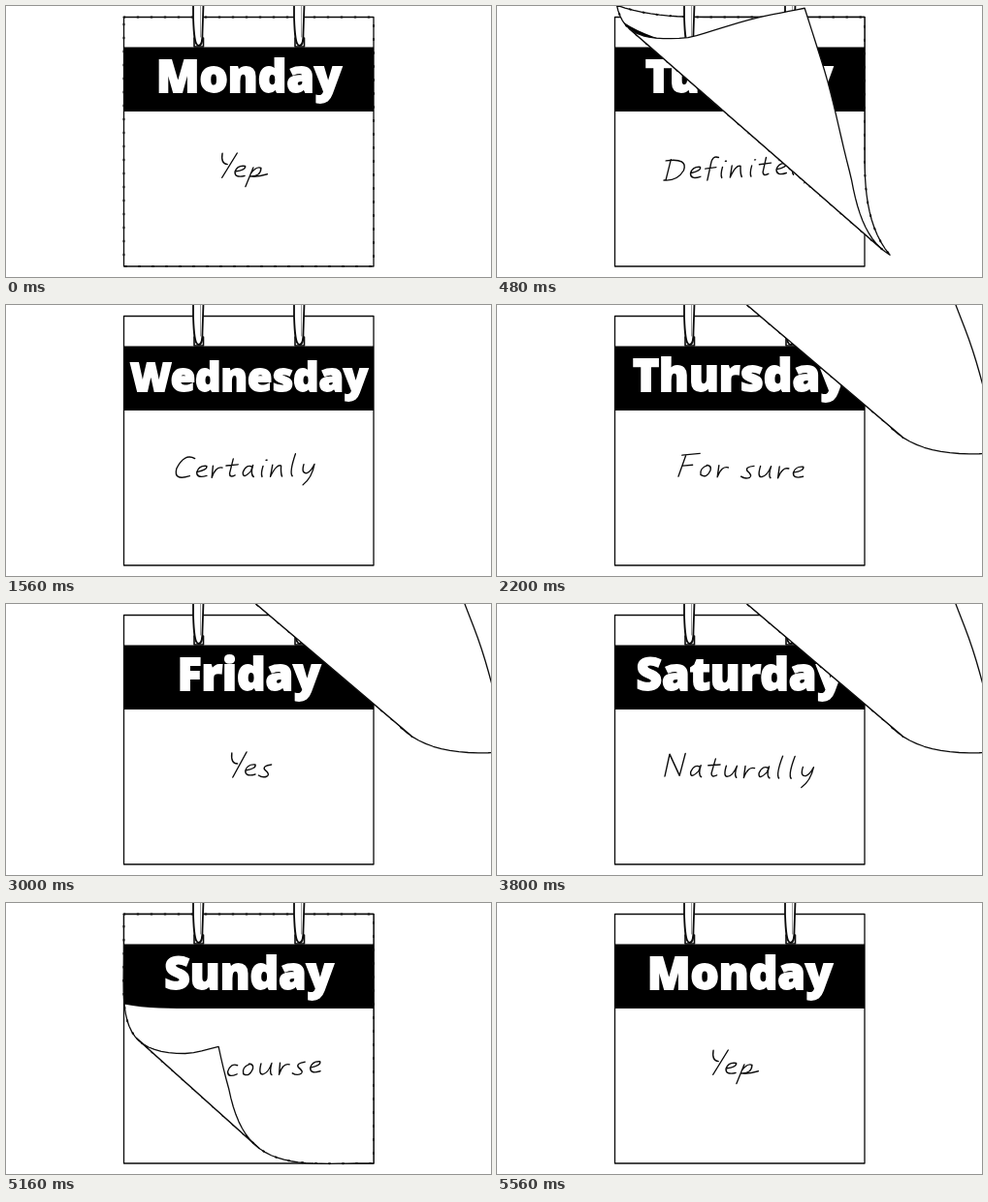
An HTML page with a canvas that plays this animation: 500x280 px, repeating every 5600 ms.

```html
<!DOCTYPE html>
<html lang="en">
<head>
<meta charset="utf-8">
<title>Calendar</title>
<style>
html, body { margin: 0; width: 100%; height: 100%; overflow: hidden; background: #fff; }
canvas { display: block; }
</style>
</head>
<body>
<canvas id="stage" width="500" height="280" role="img" aria-label="A calendar whose pages turn from Monday to Sunday"></canvas>
<script>
const ctx = document.getElementById('stage').getContext('2d');
const INK = '#0c0c0c';
const FLIP = 800, STEP = 40, REST = 120;
const LEFT = 121.5, TOP = 11.5, RIGHT = 379, BOTTOM = 269;

// day, answer, start x, baseline y, tilt in degrees
const days = [
  ['Monday', 'Yep', 217, 176, 3],
  ['Tuesday', 'Definitely', 172, 180, -2.5],
  ['Wednesday', 'Certainly', 172, 179, -1],
  ['Thursday', 'For sure', 185, 177, 1],
  ['Friday', 'Yes', 228, 178, 0],
  ['Saturday', 'Naturally', 171, 178, 1],
  ['Sunday', 'Of course', 174, 181, -2]
];

// Pen strokes: advance, path on a baseline at 0
const capitals = {
  Y: [15, 'M0-24Q1-13 8-13M15-25L6 1'],
  D: [24, 'M4-21L2 0M-1-20Q22-22 19-9Q14 2 0 0'],
  C: [21, 'M19-20Q7-26 2-10Q1 3 17-2'],
  F: [21, 'M5-22L2 0M1-22L19-24M4-11L14-12'],
  N: [25, 'M2 0L2-23L17-1L18-24'],
  O: [25, 'M12-22Q-1-18 2-4Q11 6 20-8Q22-23 10-21']
};
const bowls = {
  e: [14, 'M1-6Q12-8 10-12Q2-13 1-6Q2 1 12-2'],
  o: [16, 'M7-12Q-1-9 2-2Q9 2 11-7Q11-12 6-12'],
  a: [17, 'M10-10Q3-14 1-5Q2 3 9-6L10-12Q9-2 13 0'],
  c: [14, 'M10-11Q3-14 1-5Q2 2 11-2'],
  s: [15, 'M11-12Q2-11 5-7Q12-2 9 0Q5 2 0-1'],
  p: [18, 'M3-11L0 9M2-5Q6-13 11-11Q13-2 2-2Q9-1 19-5']
};
const stems = {
  i: [9, 'M2-11Q1-3 3 0M4-17L5-17'],
  n: [18, 'M1-12L1 0Q5-13 10-11Q11-3 13 0'],
  u: [18, 'M1-12Q0 0 5-1Q10-2 12-12Q11-2 14 0'],
  r: [14, 'M1-12L2 0Q4-12 11-10'],
  t: [15, 'M5-19L4-4Q5 1 10-2M-1-12L11-13'],
  l: [11, 'M3-23Q0-4 4 0'],
  f: [14, 'M12-21Q5-24 5-14L4 2M0-10L11-11'],
  y: [18, 'M1-12Q0-2 6-3Q10-5 12-12Q12 2 4 9'],
  ' ': [9, '']
};
const glyphs = {};
for (const [ch, [advance, d]] of Object.entries({ ...capitals, ...bowls, ...stems }))
  glyphs[ch] = { advance, path: new Path2D(d) };

// Distance of the curl axis from the lifted corner, by time within a flip
const travel = [[0, 0], [120, 20], [200, 58], [400, 190], [600, 354], [760, 560]];

function mix(a, b, k) { return a + (b - a) * k; }

function track(keys, t) {
  let i = 1;
  while (i < keys.length - 1 && t > keys[i][0]) i++;
  const [t0, v0] = keys[i - 1], [t1, v1] = keys[i];
  return mix(v0, v1, (t - t0) / (t1 - t0));
}

function rect(x0, y0, x1, y1) {
  const corners = [[x0, y0], [x1, y0], [x1, y1], [x0, y1]], n = 28, out = [];
  corners.forEach((p, i) => {
    const q = corners[(i + 1) % 4];
    for (let k = 0; k < n; k++) out.push([mix(p[0], q[0], k / n), mix(p[1], q[1], k / n)]);
  });
  return out;
}
const sheet = rect(LEFT, TOP, RIGHT, BOTTOM);
const band = rect(121, 42.5, 380, 109);

// A sheet rolled round a slanted cylinder, seen with a little perspective
function makeCurl(t) {
  const k = Math.min(1, Math.max(0, (t - 200) / 400));
  const angle = mix(43, 40.4, k) * Math.PI / 180;
  const r = mix(43, 70, k), axis = track(travel, t);
  const ex = Math.cos(angle), ey = Math.sin(angle), nx = ey, ny = -ex;
  const depth = ([x, y]) => axis - (x - LEFT) * nx - (y - BOTTOM) * ny;
  function map(p) {
    const d = depth(p);
    if (d <= 0) return p;
    const turn = Math.min(d / r, 3.6), rest = d - turn * r;
    const along = (p[0] - LEFT) * ex + (p[1] - BOTTOM) * ey - 0.25 * Math.max(0, d - 2.6 * r);
    const across = axis - r * Math.sin(turn) - rest * Math.cos(turn);
    const z = r * (1 - Math.cos(turn)) + rest * Math.sin(turn);
    const zoom = 1 + z / 780;
    const x = LEFT + nx * across + ex * along, y = BOTTOM + ny * across + ey * along;
    return [250 + (x - 250) * zoom, 140 + (y - 140) * zoom];
  }
  // Part of a polygon on the front (side 1) or back (side -1) of the roll
  function part(poly, side) {
    const height = p => side * (r * Math.PI / 2 - depth(p)), out = [];
    poly.forEach((p, i) => {
      const q = poly[(i + 1) % poly.length], hp = height(p), hq = height(q);
      if (hp >= 0) out.push(p);
      if (hp * hq < 0) {
        const m = hp / (hp - hq);
        out.push([mix(p[0], q[0], m), mix(p[1], q[1], m)]);
      }
    });
    return outline(out.map(map));
  }
  return part;
}

function outline(points) {
  const path = new Path2D();
  points.forEach(([x, y]) => path.lineTo(x, y));
  if (points.length) path.closePath();
  return path;
}

function stroke(path, width) {
  ctx.strokeStyle = INK;
  ctx.lineWidth = width;
  ctx.stroke(path);
}

function paper(path) {
  ctx.fillStyle = '#fff';
  ctx.fill(path);
  stroke(path, 1.3);
}

function write(word, x, y, tilt) {
  ctx.save();
  ctx.translate(x, y);
  ctx.rotate(tilt * Math.PI / 180);
  ctx.transform(1, 0, -0.2, 1, 0, 0);
  for (const ch of word) {
    stroke(glyphs[ch].path, 1.4);
    ctx.translate(glyphs[ch].advance + 1.6, 0);
  }
  ctx.restore();
}

function title(day) {
  const size = day.length > 8 ? 41 : 46;
  ctx.font = `800 ${size}px "Open Sans", "Noto Sans", sans-serif`;
  ctx.textAlign = 'center';
  ctx.lineJoin = 'miter';
  ctx.miterLimit = 3;
  ctx.lineWidth = 1.8;
  ctx.fillStyle = ctx.strokeStyle = '#fff';
  ctx.fillText(day, 250.5, 89);
  ctx.strokeText(day, 250.5, 89);
}

// Small ink knots along the outline of a page
function knots(path) {
  ctx.save();
  ctx.setLineDash([1, 13]);
  stroke(path, 2);
  ctx.restore();
}

function drawPage([day, ...answer], page, bar) {
  paper(page);
  ctx.save();
  ctx.clip(page);
  ctx.fillStyle = '#000';
  ctx.fill(bar);
  write(...answer);
  title(day);
  ctx.restore();
}

const tube = new Path2D('M193 -2V12C193.5 26 194 41 198.5 41C202.5 41 202.5 34 202.5 28L203.5 -2');
const shine = new Path2D('M200.5 -2V32');
const hole = new Path2D('M194 33V42H203.5V33');
function drawRing(dx) {
  ctx.save();
  ctx.translate(dx, 0);
  stroke(hole, 1.6);
  ctx.fillStyle = '#fff';
  ctx.fill(tube);
  stroke(tube, 1.8);
  ctx.globalAlpha = 0.4;
  stroke(shine, 1);
  ctx.restore();
}

function drawRings() {
  drawRing(0);
  drawRing(104);
}

const flatPage = outline(sheet), flatBand = outline(band);

function draw(time) {
  const t = time % (FLIP * days.length);
  const index = Math.floor(t / FLIP);
  let phase = Math.floor(t % FLIP / STEP) * STEP;
  if (phase < REST) phase = 0;
  const day = days[index], next = days[(index + 1) % days.length];

  ctx.fillStyle = '#fff';
  ctx.fillRect(0, 0, 500, 280);
  ctx.lineCap = ctx.lineJoin = 'round';
  if (phase === 0) {
    drawPage(day, flatPage, flatBand);
    knots(flatPage);
    drawRings();
    return;
  }
  drawPage(next, flatPage, flatBand);
  if (phase >= 760) {
    drawRings();
    return;
  }
  const part = makeCurl(phase), front = part(sheet, 1);
  drawPage(day, front, part(band, 1));
  knots(front);
  drawRings();
  paper(part(sheet, -1));
}

const start = performance.now();
function tick() {
  draw(performance.now() - start);
  requestAnimationFrame(tick);
}
tick();
</script>
</body>
</html>
```
